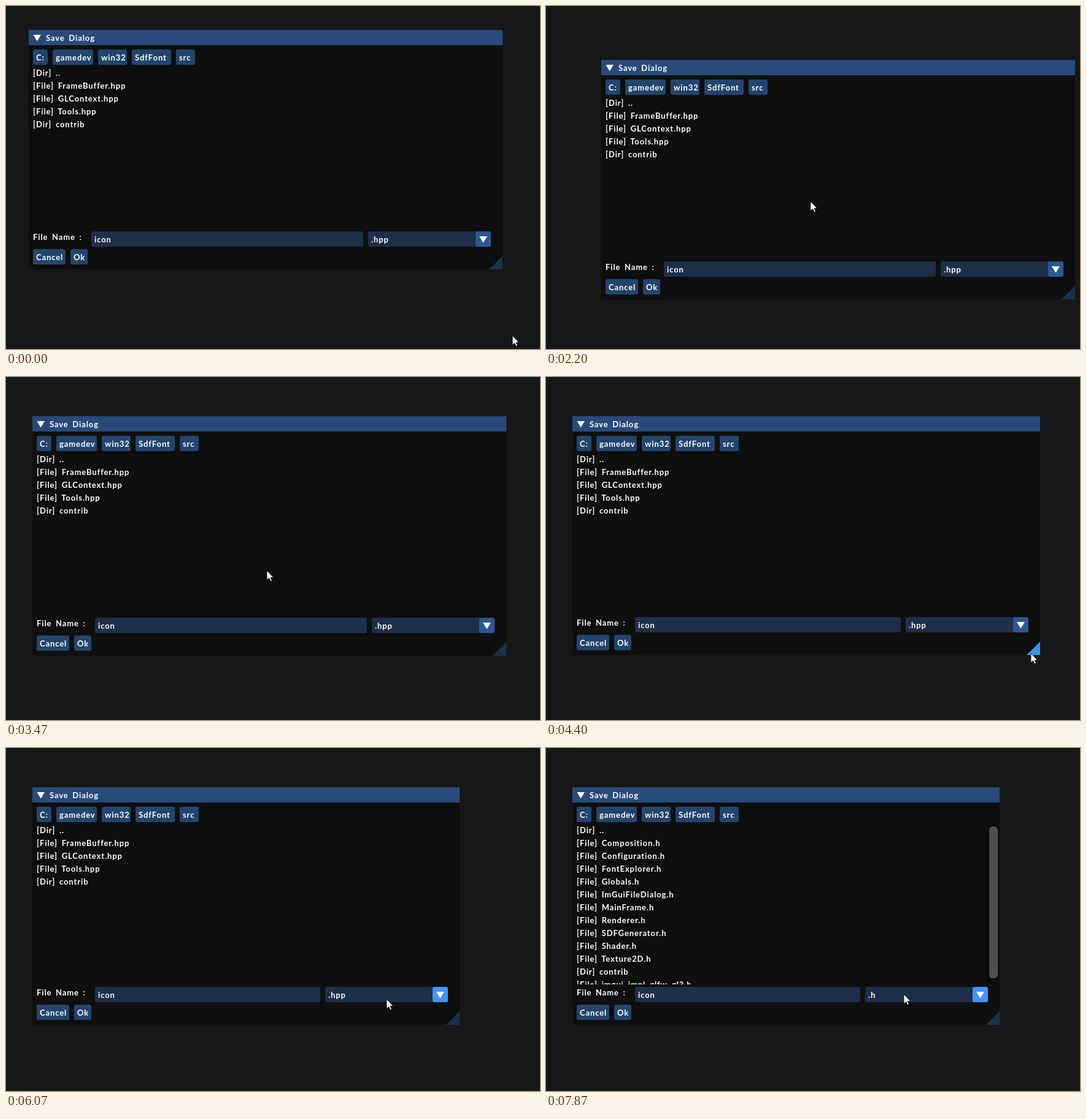
These frames come from a looping animation (870x560 px, 8 s). An HTML page:

```html
<!DOCTYPE html>
<html lang="en">
<head>
<meta charset="utf-8">
<title>Save Dialog</title>
<style>
  html, body { margin: 0; width: 100%; height: 100%; overflow: hidden; background: #161719; }
  svg { display: block; width: 870px; height: 560px; }
  text { font: 700 13px Lato, "Open Sans", sans-serif; letter-spacing: .9px; word-spacing: 2.6px; fill: #fff; }
</style>
</head>
<body>
<svg id="stage" viewBox="0 0 870 560"></svg>
<script>
const LOOP = 8000, STEP = 200 / 3;
const COLORS = {
  win: '#0f0f0f', title: '#294a7a', button: '#23456d', frame: '#1d2f49',
  arrow: '#2c5890', hot: '#4296fa', row: '#387bcb', picked: '#1f3958',
  grip: '#1c314a', gripHot: '#3169ac', gripDown: '#3f8fee'
};

// Pointer path: step, x, y
const PATH = [
  [0, 825, 538], [5, 782, 400], [9, 700, 250], [13, 640, 152],
  [16, 612, 170], [18, 580, 192], [20, 552, 208], [21, 546, 198],
  [22, 530, 204], [24, 490, 209], [26, 450, 211], [28, 390, 245],
  [29, 364, 262], [31, 398, 298], [32, 417, 311], [33, 431, 319],
  [34, 438, 321], [36, 415, 311], [38, 374, 291], [40, 368, 287],
  [42, 368, 287], [43, 370, 287], [51, 370, 287], [52, 425, 316],
  [55, 590, 390], [58, 720, 448], [60, 785, 467], [62, 808, 458],
  [63, 809, 453], [64, 809, 453], [68, 770, 448], [72, 718, 441],
  [74, 704, 442], [75, 704, 442], [77, 698, 440], [83, 733, 450],
  [84, 733, 450], [86, 712, 434], [88, 670, 414], [90, 640, 404],
  [91, 620, 410], [94, 607, 407], [97, 595, 425], [100, 578, 443],
  [103, 569, 449], [106, 564, 456], [110, 564, 456], [118, 583, 402]
];
const DRAG = [29, 43], RESIZE = [64, 83], POPUP = [94, 111];

const DIRS = ['C:', 'gamedev', 'win32', 'SdfFont', 'src'];
const DIR_BOX = [[7, 24], [39, 66], [113, 47], [168, 64], [240, 31]];
const TYPES = ['.cpp', '.h', '.hpp'];
const file = name => '[File] ' + name;
const LISTS = [
  ['[Dir] ..', ...['FrameBuffer', 'GLContext', 'Tools'].map(n => file(n + '.hpp')), '[Dir] contrib'],
  ['[Dir] ..', ...['Composition', 'Configuration', 'FontExplorer', 'Globals', 'ImGuiFileDialog',
    'MainFrame', 'Renderer', 'SDFGenerator', 'Shader', 'Texture2D'].map(n => file(n + '.h')),
    '[Dir] contrib', file('imgui_impl_glfw_gl3.h')]
];

function add(parent, tag, attrs = {}) {
  const el = document.createElementNS('http://www.w3.org/2000/svg', tag);
  set(el, attrs);
  parent.append(el);
  return el;
}
function set(el, attrs) {
  for (const k in attrs) el.setAttribute(k, attrs[k]);
}
const group = (parent, attrs) => add(parent, 'g', attrs);
const rect = (parent, x, y, width, height, fill, rx = 0) =>
  add(parent, 'rect', { x, y, width, height, fill, rx });
const path = (parent, d, fill) => add(parent, 'path', { d, fill });
function label(parent, x, y, str) {
  const el = add(parent, 'text', { x, y });
  el.textContent = str;
  return el;
}
function button(parent, x, y, w, str) {
  rect(parent, x, y, w, 25, COLORS.button, 3);
  label(parent, x + 5, y + 18, str);
}
const show = (el, on) => set(el, { visibility: on ? 'visible' : 'hidden' });
const move = (el, x, y) => set(el, { transform: `translate(${x} ${y})` });

const stage = document.getElementById('stage');
const win = group(stage);
const back = rect(win, 0, 0, 772, 391, COLORS.win);
const bar = rect(win, 0, 0, 772, 25, COLORS.title);
path(win, 'M7.5 8H20L13.7 18.5Z', '#fff');
label(win, 28, 18, 'Save Dialog');
DIRS.forEach((d, i) => button(win, DIR_BOX[i][0], 32, DIR_BOX[i][1], d));

// File list
const clip = add(add(win, 'clipPath', { id: 'listClip' }), 'rect', { x: 7, y: 61 });
const list = group(win, { 'clip-path': 'url(#listClip)' });
const rowMark = rect(list, 7, 0, 0, 21, COLORS.row);
const lists = LISTS.map(names => {
  const g = group(list);
  names.forEach((n, i) => label(g, 7, 75 + 21 * i, n));
  return g;
});
const scroll = group(list);
rect(scroll, -20, 61, 17, 261, '#0a0a0a');
rect(scroll, -17, 64, 14, 248, '#4f4f4f', 6);

// Parts tied to the lower left corner
const foot = group(win);
label(foot, 7, -48, 'File Name :');
const input = rect(foot, 102, -62, 0, 25, COLORS.frame, 3);
label(foot, 107, -44, 'icon');
button(foot, 7, -33, 53, 'Cancel');
button(foot, 68, -33, 28, 'Ok');

// Parts tied to the lower right corner
const corner = group(win);
const grip = path(corner, 'M0 0V-22L-22 0Z', COLORS.grip);
rect(corner, -219, -62, 200, 25, COLORS.frame, 3);
const arrow = rect(corner, -44, -62, 25, 25, COLORS.arrow, 3);
path(corner, 'M-38 -54H-25L-31.5 -43.5Z', '#fff');
const choice = label(corner, -214, -44, '.hpp');

const popup = group(corner);
set(rect(popup, -218.5, -36.5, 199, 72, '#141414'), { stroke: '#3d3d46' });
rect(popup, -216, 10, 194, 21, COLORS.picked);
const itemMark = rect(popup, -216, 0, 194, 21, COLORS.row);
TYPES.forEach((t, i) => label(popup, -212, -16 + 21 * i, t));

const pointer = path(stage, 'M0 0V15.5L3.6 12.3L6 17.5L8.4 16.4L6.1 11.4H10.8Z', '#fff');
set(pointer, { stroke: '#000', 'stroke-width': .8 });

const clamp = (v, [lo, hi]) => Math.max(lo, Math.min(hi, v));
const inside = (n, [lo, hi]) => n >= lo && n < hi;

function pointerAt(n) {
  const i = PATH.findIndex(k => k[0] >= n);
  if (i < 0) return PATH[PATH.length - 1].slice(1);
  if (i === 0) return PATH[0].slice(1);
  const [a, ax, ay] = PATH[i - 1], [b, bx, by] = PATH[i];
  const f = (n - a) / (b - a);
  return [Math.round(ax + (bx - ax) * f), Math.round(ay + (by - ay) * f)];
}

function draw(t) {
  const n = Math.floor((t + 4) / STEP);
  // The dialog reacts one step after the pointer
  const seen = Math.max(0, n - 1);
  const [px, py] = pointerAt(seen);
  const [dx, dy] = pointerAt(clamp(seen, DRAG));
  const [rx, ry] = pointerAt(clamp(seen, RESIZE));
  const x = dx - 327, y = dy - 223;
  const w = rx - 37, h = ry - 62;
  const open = inside(n, POPUP), changed = n >= POPUP[1];
  const dragging = inside(n, [30, 45]);

  move(win, x, y);
  set(back, { width: w, height: h });
  set(bar, { width: w });
  set(clip, { width: w - 10, height: h - 127 });
  set(input, { width: w - 329 });
  move(foot, 0, h);
  move(corner, w, h);
  move(scroll, w, 0);

  const mx = px - x, my = py - y;
  const row = Math.floor((my - 59) / 21);
  const overList = !dragging && !open && mx >= 7 && mx < w - 3 && my >= 61 && my < h - 66;
  show(rowMark, overList && row < LISTS[+changed].length);
  set(rowMark, { y: 59 + 21 * row, width: w - 10 });
  lists.forEach((g, i) => show(g, i === +changed));
  show(scroll, changed);

  const cx = mx - w, cy = my - h;
  const overCombo = cx >= -219 && cx < -19 && cy >= -62 && cy < -37;
  set(arrow, { fill: open || changed || overCombo ? COLORS.hot : COLORS.arrow });
  choice.textContent = changed ? '.h' : '.hpp';

  const overGrip = cx <= 0 && cy <= 0 && cx + cy >= -22;
  const sizing = inside(n, [65, 85]);
  set(grip, { fill: sizing ? COLORS.gripDown : overGrip ? COLORS.gripHot : COLORS.grip });

  const item = Math.floor((cy + 32) / 21);
  show(popup, open);
  show(itemMark, open && item >= 0 && item < TYPES.length);
  set(itemMark, { y: -32 + 21 * item });

  move(pointer, ...pointerAt(n));
}

function tick() {
  draw(performance.now() % LOOP);
  requestAnimationFrame(tick);
}
tick();
</script>
</body>
</html>
```
